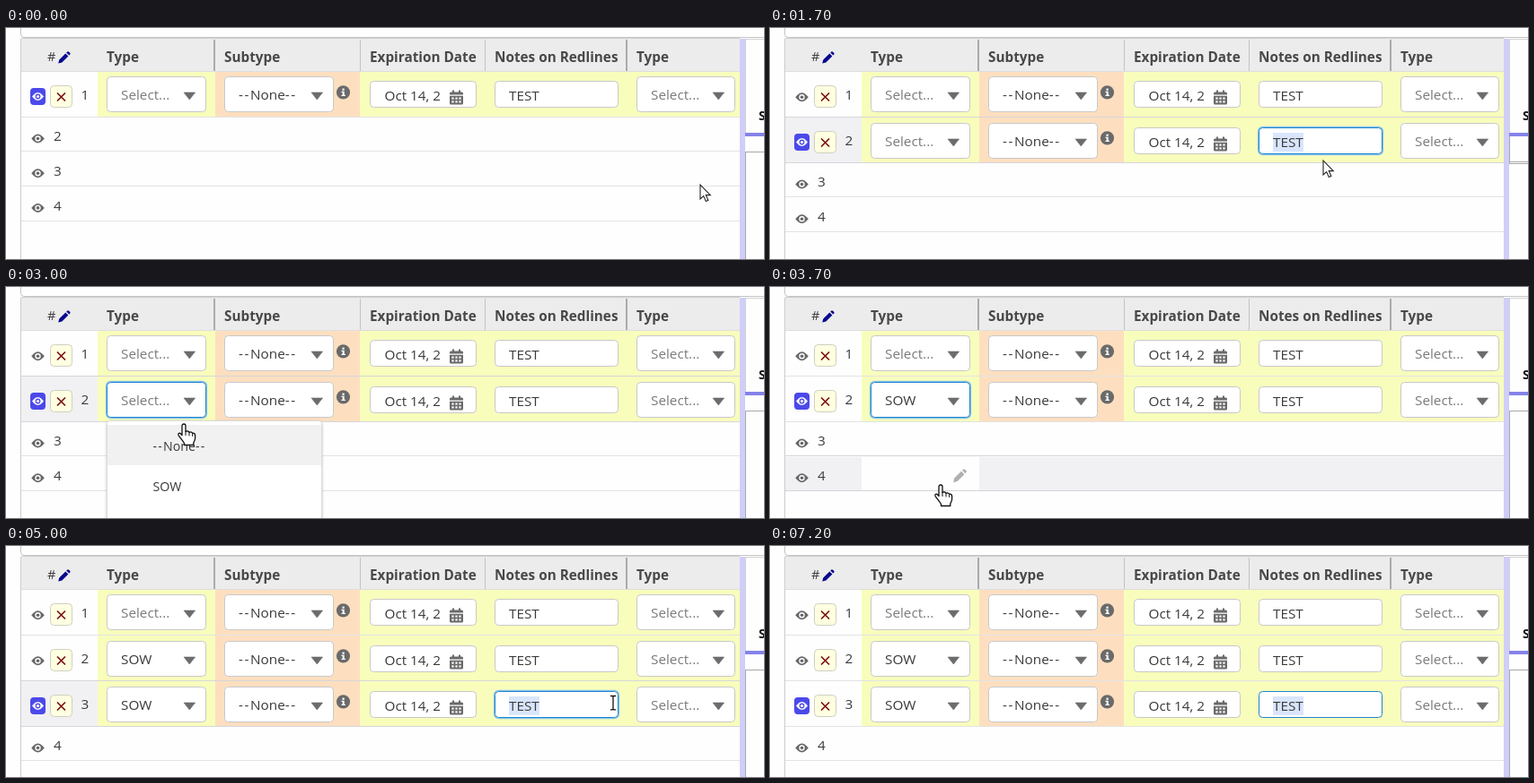
An HTML page that plays this animation: 844x258 px, repeating every 7300 ms.

```html
<!DOCTYPE html>
<html lang="en">
<head>
<meta charset="utf-8">
<title>Inline row editing</title>
<style>
html, body { margin: 0; width: 100%; height: 100%; overflow: hidden; background: #fefefe; }
svg { display: block; width: 844px; height: 258px; }
text { font: 15.3px "Open Sans", "Noto Sans", sans-serif; fill: #3a3a3a; white-space: pre; }
.head { font-weight: 700; fill: #484848; }
.hint { fill: #7a7a7a; }
.item { font-size: 14.2px; }
.tab { font-weight: 700; font-size: 14px; fill: #111; }
</style>
</head>
<body>
<svg id="stage" viewBox="0 0 844 258" xmlns="http://www.w3.org/2000/svg">
  <defs>
    <clipPath id="dateClip"><rect x="405" y="0" width="78" height="258"/></clipPath>
    <filter id="shade" x="-5%" y="-5%" width="110%" height="115%">
      <feDropShadow dx="0" dy="1" stdDeviation="1.5" flood-color="#000" flood-opacity=".25"/>
    </filter>
  </defs>
  <g id="rows"></g>
  <g id="frame"></g>
  <g id="menu"></g>
  <g id="panel"></g>
  <g id="cursor"></g>
</svg>
<script>
const LOOP = 7300, STEP = 100;
const COLS = [17, 102, 233, 394, 533.5, 691.5, 817];
const YELLOW = '#f8fdbc', ORANGE = '#fddfc0', BLUE = '#1b84d0';

// Times at which the interface changes
const EDIT2 = 1400, OPEN = 2600, PICK = 3600, EDIT3 = 5000, BLUR = 6500;
const RELOADS = [[1500, 2100], [5300, 6100]];

// Pointer path: time, x, y, shape on arrival
const PATH = [
  [0, 773, 175, 'arrow'], [200, 768, 173, 'arrow'], [700, 663, 121, 'hand'],
  [1300, 663, 121, 'hand'], [1400, 660, 124, 'beam'], [1700, 616, 148, 'arrow'],
  [2400, 197, 130, 'hand'], [2700, 197, 130, 'hand'], [3000, 198, 153, 'hand'],
  [3400, 190, 221, 'hand'], [3700, 190, 221, 'hand'], [4100, 680, 198, 'hand'],
  [4300, 680, 198, 'hand'], [4600, 670, 171, 'hand'], [4900, 670, 171, 'hand'],
  [5000, 676, 175, 'beam'], [6000, 676, 175, 'beam'], [6100, 677, 185, 'beam'],
  [6500, 690, 262, 'arrow']
];

const $ = id => document.getElementById(id);
const rect = (x, y, w, h, fill, extra = '') =>
  `<rect x="${x}" y="${y}" width="${w}" height="${h}" fill="${fill}" ${extra}/>`;
const path = (d, fill, extra = '') => `<path d="${d}" fill="${fill}" ${extra}/>`;
const text = (x, y, s, cls = '', extra = '') =>
  `<text x="${x}" y="${y}" class="${cls}" ${extra}>${s}</text>`;
const at = (x, y, body, k = 1) => `<g transform="translate(${x} ${y}) scale(${k})">${body}</g>`;
const none = gap =>
  `<tspan letter-spacing="${gap}">--</tspan>None<tspan letter-spacing="${gap}">--</tspan>`;

function box(x, y, w, h, focus = 0) {
  const edge = focus ? BLUE : '#c8c8c8';
  const glow = focus > 1
    ? rect(x - .5, y - .5, w + 1, h + 1, 'none', 'rx="5" stroke="#8cc3ea" stroke-width="1.4"') : '';
  return glow + rect(x + .5, y + .5, w - 1, h - 1, '#fff', `rx="4" stroke="${edge}"`);
}

function select(x, y, w, label, cls, focus) {
  return box(x, y, w, 40, focus) + text(x + 16, y + 26.3, label, cls) +
    path(`M${x + w - 25} ${y + 18}h12.6l-6.3 8z`, '#6c6c6c', 'stroke="#6c6c6c" stroke-width=".6" stroke-linejoin="round"');
}

function eye(x, y, on) {
  const fg = on ? '#fff' : '#666', bg = on ? '#4b49ea' : '#fefefe';
  return (on ? rect(x - 8.5, y - 9.5, 17, 19, bg, 'rx="4"') : '') + at(x, y,
    path('M-7 0Q0-9.5 7 0Q0 9.5-7 0z', fg, `stroke="${fg}" stroke-width=".4"`) +
    `<circle r="3.2" fill="${bg}"/><circle r="1.8" fill="${fg}"/>`, on ? .9 : 1);
}

const pencil = (x, y, fill, k) => at(x, y,
  path('M-7 7l1.2-4.6L2-5.4l3.4 3.4-7.8 7.8zM3-6.4l1.2-1.1q1-.8 2 .2l1.2 1.2q1 1 .1 2L6.4-3z', fill), k);

function calendar(x, y) {
  let s = path('M0 3.5q0-1.5 1.5-1.5H3V0h2v2h5V0h2v2h1.5q1.5 0 1.5 1.5V5H0z', '#6a6a6a') +
    path('M0 6.2h15v8.3q0 1.5-1.5 1.5h-12Q0 16 0 14.5z', '#6a6a6a');
  for (let i = 0; i < 6; i++) s += rect(2.4 + i % 3 * 4, 8 + (i > 2) * 3.8, 2.2, 2.2, '#fff');
  return at(x, y, s);
}

const info = (x, y) => `<circle cx="${x}" cy="${y}" r="7.6" fill="#6a6a6a"/>` +
  rect(x - 1, y - 4.2, 2.2, 2.2, '#fff') + path(`M${x - 2} ${y - 1}h3.2v4h1.2v1.2h-4.4v-1.2h1.2v-2.8h-1.2z`, '#fff');

function editRow(i, y, s) {
  const c = Math.round(49.4 + 51.4 * i); // controls snap to whole pixels
  const active = s.active === i;
  const sow = i === 2 || (i === 1 && s.t >= PICK);
  const typeFocus = i === 1 && s.t >= OPEN && s.t < EDIT3 ? 2 : 0;
  const noteFocus = i === 1 && s.t < OPEN ? 2 : i === 2 ? (s.t < BLUR ? 2 : 1) : 0;
  return rect(17, y, 85, 51, s.hover === i ? '#f1f1f3' : '#fefefe') +
    rect(102, y, 715, 51, YELLOW) + rect(233, y, 161, 51, ORANGE) +
    eye(35.5, y + (active ? 27.5 : 28.2), active) +
    rect(49.5, y + 15.5, 24, 24, '#ffffe2', 'rx="4" stroke="#cfcfc0"') +
    path(`M57 ${y + 23.5}l9 9m0-9l-9 9`, 'none', 'stroke="#7d1010" stroke-width="1.7"') +
    text(83.5, y + 30.7, i + 1) +
    select(112, c + 5, 111, sow ? 'SOW' : 'Select...', sow ? '' : 'hint', typeFocus) +
    select(243, c + 5, 122, none(1.6), '') +
    info(375.5, y + 22.8) +
    box(405, c + 10, 119, 30) +
    `<g clip-path="url(#dateClip)">${text(421.5, c + 31.7, 'Oct 14, 2024')}</g>` +
    calendar(494, c + 20.5) +
    box(544, c + 10, 138, 30, noteFocus) +
    (noteFocus ? rect(560, c + 16, 34, 21, '#d8e5fc') : '') +
    text(560, c + 31.7, 'TEST') +
    select(702, c + 5, 110, 'Select...', 'hint');
}

function plainRow(i, y, s) {
  let out = '';
  if (s.hover === i) {
    out += rect(17, y, 800, 38.7, '#f1f1f3');
    const c = COLS.findIndex((x, k) => k > 0 && s.x >= x && s.x < COLS[k + 1]);
    if (c > 0) {
      out += rect(COLS[c], y, COLS[c + 1] - COLS[c], 38.7, '#fefefe') +
        pencil(COLS[c + 1] - 22, y + 21.5, '#b0b0b0');
    }
  }
  return out + eye(35.5, y + 23.5, false) + text(53, y + 26.2, i + 1);
}

function drawRows(s) {
  let out = '', lines = '';
  s.tops.forEach((y, i) => {
    if (i < 4) out += i < s.edited ? editRow(i, y, s) : plainRow(i, y, s);
    if (i) {
      const near = s.hover === i || s.hover === i - 1;
      lines += rect(17, Math.floor(y) - 1, 800, 1, near ? '#d6d6da' : '#e3e3e3');
    }
  });
  return out + lines;
}

function drawFrame() {
  const labels = [[112, 'Type'], [243, 'Subtype'], [405, 'Expiration Date'],
    [544, 'Notes on Redlines'], [702, 'Type']];
  return path('M16.5 0V7q0 3.5 4 3.5H844', 'none', 'stroke="#c4c4c4"') +
    rect(17, 12, 800, 37, '#ececec') + rect(17, 11, 800, 1, '#cfcfcf') +
    rect(17, 48, 800, 1, '#dedede') + rect(16, 12, 1, 246, '#cccccc') +
    [231, 690].map(x => rect(x, 13, 2, 35, '#ababab')).join('') +
    [394, 533].map(x => rect(x, 13, 1, 35, '#c2c2c2')).join('') +
    labels.map(([x, s]) => text(x, 38.4, s, 'head')).join('') +
    text(46, 36.5, '#', '', 'style="font-size:14.5px"') + pencil(64.5, 33.3, '#07078f', .9);
}

function drawMenu(s) {
  if (s.t < OPEN || s.t >= PICK) return '';
  const onSow = s.y > 199;
  return rect(112.5, 149.5, 239, 140, '#fff', 'rx="3" stroke="#dcdcdc" filter="url(#shade)"') +
    rect(113, onSow ? 199 : 154, 238, 45, '#f1f1f1') +
    text(163.5, 183, none(1.2), 'item') + text(163.5, 228, 'SOW', 'item');
}

function drawPanel(t) {
  const busy = RELOADS.some(([a, b]) => t >= a && t < b);
  const edge = '#a8a8a8';
  const view = busy
    ? rect(823, 121, 1, 31, edge) + rect(823, 149, 21, 1, edge) + rect(823, 151, 21, 1, edge)
    : rect(823, 138, 21, 1, edge) + rect(823, 138, 1, 120, edge);
  return rect(817, 12, 27, 246, '#fefefe') + rect(817, 12, 6, 246, '#d0cefa') +
    rect(823, 12, 1, 105, '#d2d2d2') + rect(823, 12, 21, 1, '#d2d2d2') +
    text(838, 102.5, 'Summary', 'tab') +
    rect(823, 117, 21, 4, '#8583e9') + view;
}

const SHAPES = {
  arrow: path('M0 0V16l3.7-3.4 2.6 6 2.6-1.1-2.6-5.9h5z', '#fff', 'stroke="#222" stroke-width="1.1"'),
  hand: path('M-2 2C-2-.7 2-.7 2 2V8.5C3 7.6 5.6 7.8 6 9.4C7.2 8.5 9.2 9 9.6 10.4C11 9.8 12.6 10.8 12.6 12.5V16' +
    'C12.6 18 11.4 19.5 10.8 21V23.5H.5V21.5C-1 19-4 15.5-5.8 12.8C-7 10.8-5 9.4-3.6 10.8L-2 12.5z',
    '#fff', 'stroke="#111" stroke-width="1.3" stroke-linejoin="round"') +
    path('M2 8v5M6 9.4v4M9.6 10.4v3.4', 'none', 'stroke="#111"'),
  beam: path('M-3-7.5h2.2l.8.8.8-.8H3M0-6.7V7M-3 7.8h2.2L0 7l.8.8H3', 'none', 'stroke="#111" stroke-width="1.3"')
};

function pointer(t) {
  const n = PATH.findIndex(p => p[0] > t);
  if (n < 0) return null;
  const a = PATH[n - 1], b = PATH[n];
  const u = (t - a[0]) / (b[0] - a[0]), e = u * u * (3 - 2 * u);
  return { x: a[1] + (b[1] - a[1]) * e, y: a[2] + (b[2] - a[2]) * e, shape: u > .75 ? b[3] : a[3] };
}

function render(t) {
  const p = pointer(t);
  const edited = t < EDIT2 ? 1 : t < EDIT3 ? 2 : 3;
  const tops = [49];
  for (let i = 0; i < 4; i++) tops.push(tops[i] + (i < edited ? 51 : 38.7));
  let hover = -1;
  if (p && t >= 200) {
    hover = t >= OPEN && t < PICK ? 1 : tops.findIndex((y, i) => i < 4 && p.y >= y && p.y < tops[i + 1]);
  }
  const s = { t, edited, tops, hover, active: edited - 1, x: p ? p.x : -1, y: p ? p.y : -1 };
  $('rows').innerHTML = drawRows(s);
  $('menu').innerHTML = drawMenu(s);
  $('panel').innerHTML = drawPanel(t);
  $('cursor').innerHTML = p ? at(p.x.toFixed(1), p.y.toFixed(1), SHAPES[p.shape]) : '';
}

$('frame').innerHTML = drawFrame();
let start, last = -1;
function tick(now) {
  start ??= now;
  const t = Math.floor((now - start) % LOOP / STEP) * STEP;
  if (t !== last) render(last = t);
  requestAnimationFrame(tick);
}
render(0);
requestAnimationFrame(tick);
</script>
</body>
</html>
```
